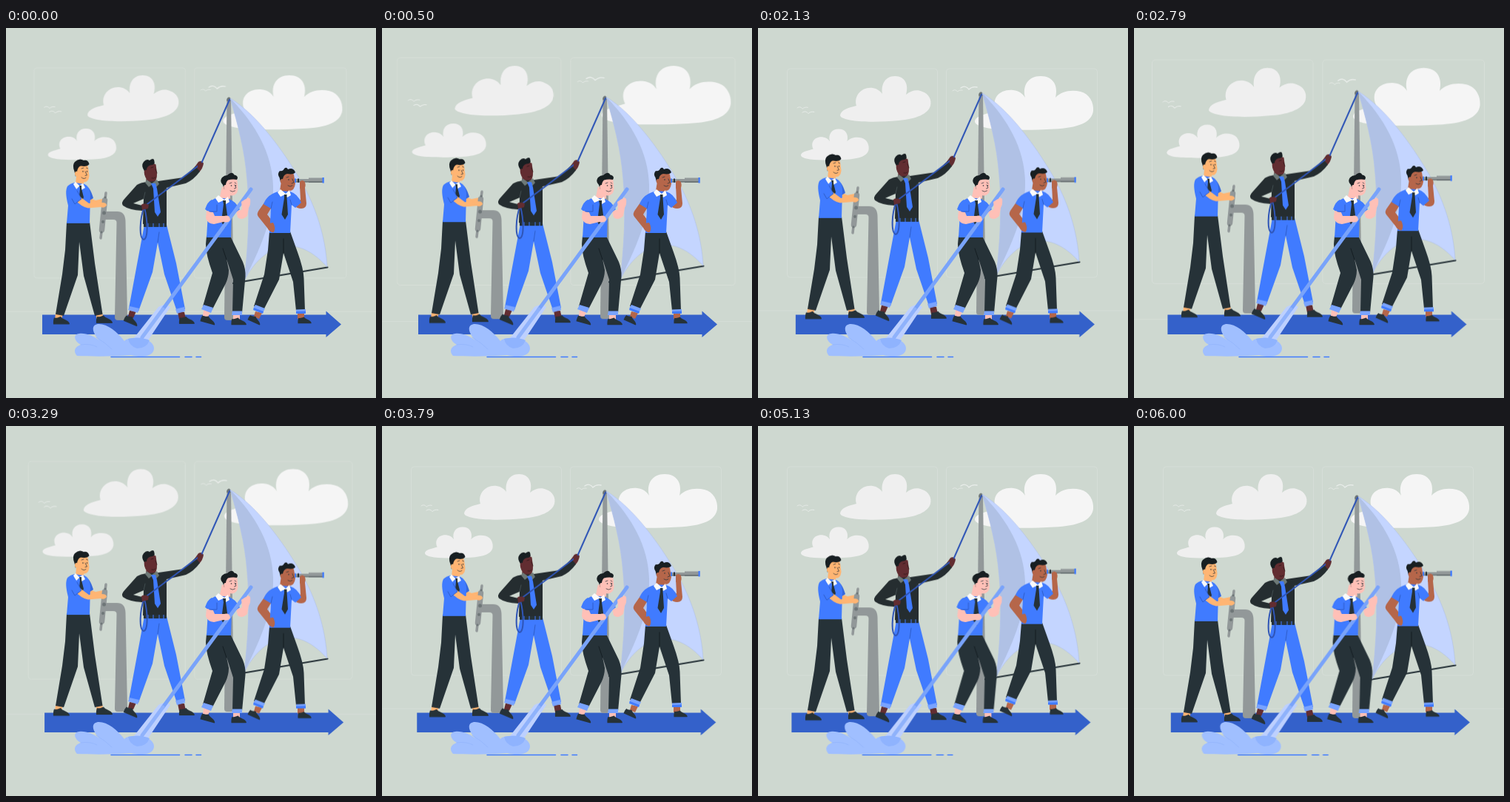
Animation, 500 px wide and 500 px high, one loop 6040 ms. Source, as an HTML page:

```html
<!DOCTYPE html>
<html lang="en">
<head>
<meta charset="utf-8">
<title>Crew on an arrow</title>
<style>
html, body { margin: 0; width: 100%; height: 100%; overflow: hidden; background: #ced8d0; }
svg { display: block; width: 100vw; height: 100vh; }
.scene, .arrow, .deck, .lookout, .rower { animation: 6040ms linear infinite; }
.scene { animation-name: beat; transform-origin: 250px 219px; }
.arrow { animation-name: shake; }
.deck { animation-name: float; }
.lookout { animation-name: lateFloat; }
.rower { animation-name: lateShake; }
@keyframes beat {
  0% { transform: scale(1.0067); }
  9.272%, 49.007% { transform: scale(1.1); }
  29.139%, 39.073%, 58.94%, 100% { transform: scale(1); }
}
@keyframes float {
  0% { transform: translateY(-.13px); }
  49.007% { transform: translateY(-10px); }
  98.675% { transform: translateY(0); }
  100% { transform: translateY(-.27px); }
}
@keyframes lateFloat {
  0%, 32.45% { transform: translateY(0); }
  82.119% { transform: translateY(-10px); }
  100% { transform: translateY(-6.4px); }
}
@keyframes shake {
  0%, 15.894% { transform: translateX(0); }
  25.828% { transform: translateX(-1px); }
  35.762%, 95.364% { transform: translateX(2px); }
  45.695%, 65.563%, 85.43% { transform: translateX(-4px); }
  55.629%, 75.497% { transform: translateX(4px); }
  100% { transform: translateX(.6px); }
}
@keyframes lateShake {
  0%, 73.841% { transform: translateX(0); }
  83.775% { transform: translateX(-1px); }
  93.709% { transform: translateX(2px); }
  100% { transform: translateX(-1.8px); }
}
.blue { fill: #407bff; }
.dark { fill: #263238; }
.hair { fill: #181f22; }
.white { fill: #fafafa; }
.cuff { fill: #79a3ff; }
.grey { fill: #929899; }
.line { fill: none; stroke-linecap: round; stroke-linejoin: round; }
.ink { stroke: #263238; stroke-width: .7; }
.fold { stroke: #2b57bd; stroke-width: .8; }
.tan { fill: #ffb573; }
.brown { fill: #622d31; }
.pink { fill: #ffc0b7; }
.copper { fill: #b5664a; }
</style>
</head>
<body>
<svg viewBox="0 0 500 500">
<defs>
  <path id="cloud" d="M0 61C1 54 12 52 29 47C21 29 35 17 52 19C60 20 65 24 68 29C64 13 72 0 89 0C106 0 113 13 109 29C117 20 131 18 143 21C155 24 161 36 160 47C158 63 139 70 107 71.500C77 73.500 42 73 22 71C9 69 0 66 0 61Z"/>
  <path id="shoe" class="dark" d="M1 1.500C4 2.500 7 1 10 0C12 4 20 4 22 9.500L21.500 10.500H0C-.3 7 0 4 1 1.500Z"/>
  <path id="bird" class="line" d="M0 3C4 0 8 1 11 5C14 2 18 1 22 2"/>
</defs>

<g class="scene">
  <g fill="none" stroke="#d9e0da" stroke-width=".8">
    <rect x="39.500" y="55" width="203" height="282" rx="4"/>
    <rect x="254.500" y="55" width="204" height="282" rx="4"/>
    <path d="M0 382H500"/>
  </g>
  <path fill="#efefef" d="M111 118C112 111 121 108 133 105C129 92 140 79 155 81C161 82 165 85 168 89C166 76 172 65 185 65C199 65 204 77 200 90C207 84 216 83 222 86C231 89 235 97 233 105C230 116 214 123 190 125C165 127.500 140 127 128 125C118 123.500 111 121 111 118Z"/>
  <use href="#cloud" transform="translate(58 136.500) scale(.573 .577)" fill="#efefef"/>
  <use href="#cloud" transform="translate(293 65)" fill="#f5f5f5"/>
  <g stroke="#e9edea" stroke-width="1.300">
    <use href="#bird" transform="translate(53 106) scale(.65)"/>
    <use href="#bird" transform="translate(60 112) scale(.72)"/>
    <use href="#bird" transform="translate(263 83) scale(.6)"/>
    <use href="#bird" transform="translate(274 78)"/>
  </g>
</g>

<path class="arrow" fill="#3461ca" d="M49 387.500H432.500V382.500L453 400.500L432.500 418V414H49Z"/>

<g class="deck">
  <!-- mast and sail -->
  <path class="grey" d="M298.500 97Q301 90 304 97L308 391Q308 395 304 395H299Q295 395 295 391Z"/>
  <path fill="#6d7577" d="M298.300 99V96Q301 91 304.300 96V99Z"/>
  <path class="line" d="M307 345L434.500 323.500" stroke="#263238" stroke-width="2.200"/>
  <path fill="#c4d5ff" stroke="#a9bbe6" stroke-width=".5" d="M303 95C340 118 374 165 398 206C419 242 432 283 434 323C385 268 340 304 322 342C327 297 330 250 326 207C323 165 313 130 303 95Z"/>
  <path fill="#b0c1e5" d="M303 95C338 131 360 170 361 214C362 260 342 300 322 342C327 297 330 250 326 207C323 165 313 130 303 95Z"/>

  <!-- helm -->
  <path class="grey" d="M131 248H150Q161 248 161.500 261L164 391Q164 395 160 395H151Q147 395 147 391L149.500 263Q149.500 259 145 259H131Z"/>

  <g>
    <path class="tan" d="M111 229L121 233L131 231Q135 233 132 237L119 239L108 234Z"/>
    <path fill="#3568dd" d="M106 213Q113 213 118 230L110 235Z"/>
    <g class="tan">
      <path d="M67 386H77L75 394H66ZM122 385H130L132 393H122Z"/>
      <path d="M95 200L105 204V213Q100 216 94 211Z"/>
      <path d="M94 186Q108 180 111 188L112.500 200Q111.500 209 105 208.500Q97 207 95 199Z"/>
    </g>
    <path class="hair" d="M94 201L92.500 194Q89 185 93 181Q99 175 105 179Q111 178 112.500 184Q110 188 101 186.500Q96.500 188 96 195Z"/>
    <ellipse class="tan" cx="95.500" cy="197" rx="2.500" ry="3.200"/>
    <path class="line ink" d="M102 190L105 189M108.500 189L110.500 190M102 202Q105 205 108 202.500M107 194L109.500 199L107 199.500"/>
    <circle cx="104" cy="194" r=".8" class="dark"/><circle cx="109.500" cy="194" r=".8" class="dark"/>
    <path class="dark" d="M82 262H113L120 318L130.500 387L120 389L105 335L99 289L97 334L78 389L67 387L76 333L80 300Z"/>
    <use href="#shoe" x="64" y="390"/>
    <use href="#shoe" x="122" y="388.500"/>
    <path class="blue" d="M93 209L106 211Q113 214 114 225L113 264H82L84 240Q79 221 83 214Q87 210 93 209Z"/>
    <path class="white" d="M94 208L99 213L104 210L107 216L102 219L99 214L95 218L91 211Z"/>
    <path class="dark" d="M99 213L102 213L102 217L105 229L103 233L99 229L100 217Z"/>
    <g class="line" stroke="#929899">
      <path d="M135 223L128 284" stroke-width="3.500"/>
      <path d="M133.500 233L129.500 273" stroke-width="7.500"/>
    </g>
    <g fill="#6e7678"><circle cx="134" cy="229" r="1.500"/><circle cx="132.500" cy="250" r="2.500"/><circle cx="131" cy="262" r="2"/><circle cx="129" cy="276" r="1.500"/></g>
    <path class="tan" d="M93 232L100 228L112 237L130 236Q136 236 136 240Q133 244 128 242L111 243.500Q102 242 93 232Z"/>
    <path class="blue" d="M84 216Q92 210 96 220L102 231L93 238Q85 232 84 216Z"/>
    <path class="line fold" d="M96 220L102 231L93 238L89 231"/>
  </g>

  <!-- rope hauler -->
  <g>
    <g class="brown">
      <path d="M167 382L176 383L172 392L165 390ZM232 384H241L243 394H234Z"/>
      <path d="M190 198L202 202V212Q196 215 189 209Z"/>
      <path d="M186.500 188Q196 180 202.500 184.500L204 196Q204.500 208 198.500 208.500Q189 207 187 198Z"/>
      <path d="M182 240Q186 235 193 238Q195 243 190 246L183 247Z"/>
      <path d="M255 188L260 181Q265 178 267 183Q266 190 261 195Z"/>
    </g>
    <path class="hair" d="M187 193Q182 186 186 181Q190 176 194 179Q200 174.500 200.500 180.500Q202 185 195 185.500Q190 187 190 192Z"/>
    <ellipse class="brown" cx="189" cy="195" rx="2.200" ry="3"/>
    <path class="line" stroke="#30181a" stroke-width=".8" d="M196 189L199 188M197 203Q200 204 202 202M202 191L204 196"/>
    <path class="blue" d="M187 266H217L230 318L242 380L231 383L214 333L205 290L198 330L179 383L166 379L176 325Z"/>
    <path class="line fold" d="M205 290L207 276"/>
    <path class="cuff" d="M167 376L180 379L178 385L165 381ZM229 380L241 377L242 383L231 386Z"/>
    <use href="#shoe" transform="translate(162.500 387) rotate(23) scale(.9)"/>
    <use href="#shoe" transform="translate(234 390) scale(.95)"/>
    <path fill="#252d30" d="M190 208L206 207L240 202L256 187L262 194Q254 205 243 210L217 216L217 265H185L186 231L172 237L184 240V247Q166 246 158 240Q155 236 161 230L177 212Q182 209 190 208Z"/>
    <path class="line" stroke="#4a5659" stroke-width=".8" d="M186 231L188 222M217 216L213 221"/>
    <path fill="#6d7977" d="M190 205L197 210L204 205L207 211L202 216L198 211L193 215L188 209Z"/>
    <path class="blue" d="M196 210L202 210L204 217L209 249L205 255L201 249L199 217Z"/>
    <path class="dark" d="M186 264H217V269H186Z"/>
    <path stroke="#407bff" d="M192 264V269M199 264V269M207 264V269M213 264V269"/>
    <path class="line" stroke="#2f55b6" stroke-width="2" d="M302 97L264 183Q225 213 187 241C180 260 180 284 186 286C192 285 192 262 187 243"/>
    <path class="brown" d="M183 239Q188 236 193 239L192 244L184 246ZM259 183Q264 179 266 184L263 189L259 189Z"/>
  </g>
</g>

<g class="rower">
  <g class="pink">
    <path d="M267 381L276 383L273 391L266 389ZM307 385H316V394H307Z"/>
    <path d="M292 214L303 222V230Q296 234 289 228Z"/>
    <path d="M295 205Q309 199 312.500 206L313.500 218Q312 227 304 226.500Q296 224 295 215Z"/>
    <path d="M311 247L318 246L323 234Q326 227 330 231Q331 238 328 243L326 254Q319 261 313 256Z"/>
  </g>
  <path class="hair" d="M295 218L293 212Q288 207 292 202Q295 199 299 199Q306 193 308.500 198.500Q315 200 312 205Q306 204 300 205.500Q297 208 297 213Z"/>
  <ellipse class="pink" cx="296.500" cy="215" rx="2.300" ry="3"/>
  <path class="line ink" d="M302 210L305 209M309 209L311 210M303 220Q306 222.500 309.500 220M309 212L311 216L308.500 217"/>
  <circle cx="304.500" cy="213" r=".8" class="dark"/><circle cx="310.500" cy="213" r=".8" class="dark"/>
  <path class="dark" d="M271 281H303L320 316Q324 326 323.500 336L319 385H306L307 340L298 312L301 327Q301 336 297 345L279 380L266 376L279 331Q270 306 270 292Z"/>
  <path class="line" stroke="#11191d" stroke-width=".8" d="M298 313L293 298"/>
  <path class="cuff" d="M267 374L280 378L277 385L264 380ZM306 382.500H319V388H305Z"/>
  <use href="#shoe" transform="translate(265 387) rotate(15) scale(.92)"/>
  <use href="#shoe" transform="translate(304.500 391.500) scale(.93)"/>
  <path class="blue" d="M286 229L301 231Q309 233 316 245L308 251L305 249L304 283H271L273 251L270 244Q275 232 286 229Z"/>
  <path class="white" d="M287 226L295 232L300 228L302 235L297 238L294 233L287 236L283 230Z"/>
  <path class="dark" d="M293 233L297 233L297 238L300 260L296 270L291 262L294 238Z"/>
  <path fill="#bdd0ff" d="M206 377Q216 371 222 377L192 422L172 420Z"/>
  <path class="line" stroke="#79a3fa" stroke-width="5" d="M331 218L212 380"/>
  <path class="line" stroke="#8fb2fb" stroke-width="5" d="M212 380L184 418"/>
  <path class="pink" d="M271 247L279 247L282 254L295 254Q302 252 303 259Q301 264 294 262L281 265Q272 264 270 257Z"/>
  <path class="blue" d="M278 232Q286 235 285 248Q278 251 269 245Q272 235 278 232Z"/>
  <path class="line fold" d="M285 239V248L275 248"/>
  <path class="pink" d="M318 235L324 231Q328 234 325 239L319 244Z"/>

  <!-- splash -->
  <path fill="#a0bfff" d="M96 443C91 438 92 431 101 428C92 423 90 414 99 413C108 412 118 416 126 422C117 412 114 402 124 400C136 399 150 410 160 423C165 417 179 419 189 421C198 424 202 431 199 437C195 445 180 445 169 442C147 444 117 444 96 443Z"/>
  <path fill="#8fb3fe" d="M165 420Q180 416 194 422Q190 433 177 433Q167 430 165 420Z"/>
  <path class="line" stroke="#93b5fc" stroke-width=".8" d="M122 418Q134 425 143 434M101 428Q114 426 123 431"/>
  <path class="line" stroke="#407bff" stroke-width="1.500" d="M142 444.500H234.500M242 444.500H251M257 444.500H263.500"/>
</g>

<g class="lookout">
  <g class="copper">
    <path d="M337 383L346 385L342 393L335 390ZM394 384H403V393H394Z"/>
    <path d="M372 207L384 214V222Q377 227 370 220Z"/>
    <path d="M371 198Q386 192 389 198L391 210Q390 220.500 382 220Q373 218 372 210Z"/>
    <path d="M349 236L359 242L353 252L363 265Q365 271 362 276Q357 277 353 270L341 255Q338 251 342 246Z"/>
    <path d="M388 239L398 232L397 213Q397 207 402 207Q406 209 404 216L406 237Q406 244 399 244Q393 244 388 239Z"/>
  </g>
  <path class="hair" d="M371 208L369.500 202Q366 197 370 193Q374 194 376 190Q379 187 381 191Q388 188 391 195Q389 198.500 380 197Q375 198 374 204Z"/>
  <ellipse class="copper" cx="373" cy="207" rx="2.300" ry="3"/>
  <path class="line ink" d="M379 202L382 201M381 213Q384 215.500 387 213M387 204L389 209L386 210"/>
  <circle cx="382" cy="205" r=".8" class="dark"/>
  <path class="dark" d="M356 275H384L394 303Q402 325 402.500 338L404 382H392L388 343L375 304L369 340L348 381L335 376L349 333L354 300Z"/>
  <path class="line" stroke="#11191d" stroke-width=".8" d="M375 304L375 285"/>
  <path class="cuff" d="M337 374L350 379L347 385L334 379ZM392 380.500L405 380V386H392Z"/>
  <path fill="#407bff" d="M335 378L348 383L347 386L334 381ZM392 383L405 382.500V386H392Z"/>
  <use href="#shoe" transform="translate(330 386.500) rotate(24) scale(.82)"/>
  <use href="#shoe" transform="translate(394.500 390.500) scale(.83)"/>
  <path class="blue" d="M371 220L384 221Q394 224 399 236L391 243L386 239L384 277H356L358 244L348 238Q353 224 371 220Z"/>
  <path class="line fold" d="M358 244L360 235M386 239L384 232"/>
  <path class="copper" d="M355 264L361 263Q365 270 362 276Q357 277 354 271Z"/>
  <path class="white" d="M371 218L378 224L383 219L385 226L380 229L377 225L371 228L367 222Z"/>
  <path class="dark" d="M376 225L379.500 225L379.500 229L381 252L377 259L372.500 252L376 230Z"/>
  <path class="grey" d="M391 204H409V208.500H391ZM409 202.500H428V209H409Z"/>
  <path fill="#6e7678" d="M391 207H409V208.500H391ZM409 207H428V209H409Z"/>
  <path class="blue" d="M390 203.500H392V209H390ZM427.500 202H429.800V209.500H427.500Z"/>
  <path class="dark" d="M394 203.500H396V208.800H394Z"/>
  <path class="copper" d="M397 208Q400 204 404 208L404 217L397 217Z"/>
</g>
</svg>
</body>
</html>
```
